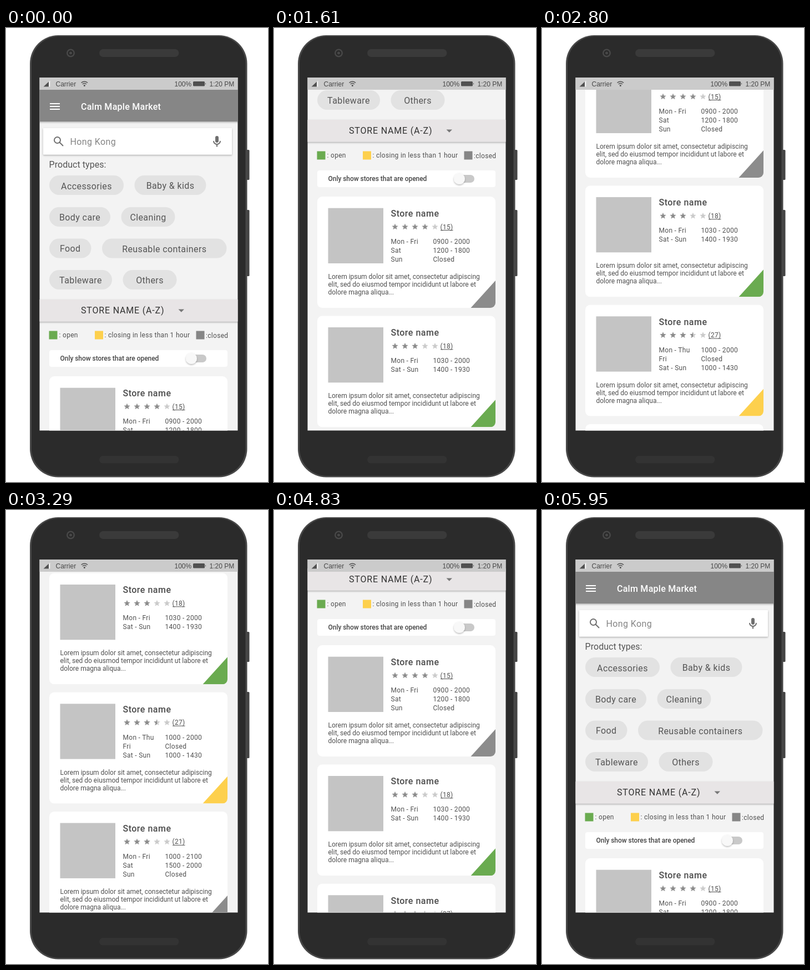
An HTML page that plays this animation: 472 px wide and 816 px high, repeating every 6.16 s.

```html
<!DOCTYPE html>
<html lang="en">
<head>
<meta charset="utf-8">
<title>Store list</title>
<style>
  html, body { margin: 0; width: 100%; height: 100%; overflow: hidden; background: #fff; }
  svg { display: block; font-family: Roboto, sans-serif; }
  .status { font: 12px "Liberation Sans", Arial, sans-serif; fill: #484848; }
  .label { font-size: 16px; letter-spacing: .4px; fill: #555; }
  .hint { fill: #858585; }
  .heading { letter-spacing: .05px; }
  .pill { text-anchor: middle; }
  .sort { font-size: 16px; letter-spacing: .82px; fill: #333; }
  .title { font-size: 16px; font-weight: 500; letter-spacing: .25px; fill: #fff; }
  .name { font-size: 16px; font-weight: 500; letter-spacing: .5px; fill: #4c4c4c; }
  .small { font-size: 12px; letter-spacing: .3px; fill: #505050; }
  .body { font-size: 12px; fill: #505050; }
  .option { font-size: 12px; font-weight: 500; letter-spacing: -.04px; fill: #444; }
</style>
</head>
<body>
<svg width="472" height="816" viewBox="0 0 472 816">
  <defs>
    <clipPath id="screen"><rect x="60.500" y="89" width="357" height="634.500"/></clipPath>
    <clipPath id="card"><rect x="78" width="321" height="200" rx="9"/></clipPath>
    <clipPath id="leftHalf"><rect x="-7" y="-7" width="7" height="14"/></clipPath>
    <filter id="shadow" x="-20%" y="-20%" width="140%" height="150%">
      <feDropShadow dx="0" dy="1.5" stdDeviation="1.5" flood-opacity=".3"/>
    </filter>
  </defs>

  <g id="phone">
    <rect x="430" y="219" width="8.5" height="54" rx="1.5" fill="#444"/>
    <rect x="430" y="327" width="8.5" height="119" rx="1.5" fill="#444"/>
    <rect x="43" y="13" width="391.500" height="794.500" rx="51" fill="#484848"/>
    <rect x="46" y="15" width="385.500" height="790" rx="49" fill="#2b2b2b"/>
    <circle cx="116.500" cy="45" r="7.500" fill="#484848"/>
    <circle cx="116.500" cy="45" r="5" fill="#292929"/>
    <circle cx="116.500" cy="45" r="2.500" fill="#484848"/>
    <rect x="168" y="38" width="143.500" height="14" rx="7" fill="#3a3a3a"/>
    <rect x="168" y="769" width="143.500" height="13.500" rx="6.700" fill="#333"/>
  </g>

  <g clip-path="url(#screen)">
    <rect x="60" y="89" width="358" height="635" fill="#f3f3f3"/>
    <g id="page">
      <rect x="56" y="100" width="366" height="68" fill="#868686" filter="url(#shadow)"/>
      <path d="M79 136h18M79 141h18M79 146h18" stroke="#fff" stroke-width="2"/>
      <text class="title" x="135" y="147">Calm Maple Market</text>

      <rect x="67" y="180" width="340" height="47.500" rx="1" fill="#fff" filter="url(#shadow)"/>
      <g fill="none" stroke="#6f6f6f" stroke-width="2">
        <circle cx="92.500" cy="201.500" r="5.500"/>
        <path d="M96.500 205.500l6.500 6.500"/>
        <path d="M374 203a6 6 0 0 0 12 0M380 209v4.500"/>
      </g>
      <rect x="377" y="194" width="6" height="12" rx="3" fill="#6f6f6f"/>
      <text class="label hint" x="115.500" y="210">Hong Kong</text>
      <text class="label heading" x="77.500" y="251">Product types:</text>
      <g id="pills"></g>

      <rect x="56" y="488" width="366" height="39.500" fill="#e8e5e6" filter="url(#shadow)"/>
      <text class="sort" x="135" y="513">STORE NAME (A-Z)</text>
      <path d="M310.500 505.500h10.500l-5.200 5.200z" fill="#777"/>

      <rect x="77.500" y="544.500" width="15" height="15" fill="#6aab50"/>
      <rect x="160" y="544.500" width="15" height="15" fill="#fdd04d"/>
      <rect x="342.500" y="544.500" width="15" height="15" fill="#868686"/>
      <text class="small" x="95.500" y="556">: open</text>
      <text class="small" x="177.500" y="556">: closing in less than 1 hour</text>
      <text class="small" x="360" y="557">:closed</text>

      <rect x="78" y="579" width="321" height="30" rx="4" fill="#fff"/>
      <text class="option" x="97.500" y="598">Only show stores that are opened</text>
      <rect x="326" y="587" width="35" height="14" rx="7" fill="#c9c9c9"/>
      <circle cx="334" cy="594" r="10" fill="#f8f8f8" filter="url(#shadow)"/>
      <g id="cards"></g>
    </g>

    <rect x="60" y="89" width="358" height="22" fill="#cbcbcb"/>
    <path d="M67.500 105.500h12v-11z" fill="#eee"/>
    <path d="M67.500 105.500h9.500v-9z" fill="#505050"/>
    <text class="status" x="89.500" y="104.500">Carrier</text>
    <g fill="none" stroke="#505050" stroke-width="1.500">
      <path d="M135.500 98.500q5.800-4.600 11.600 0M137.700 101q3.600-2.800 7.200 0"/>
    </g>
    <circle cx="141.300" cy="103.500" r="1.500" fill="#505050"/>
    <text class="status" x="303.500" y="104.500">100%</text>
    <rect x="337" y="96" width="21" height="8.500" rx="1.500" fill="#505050"/>
    <path d="M359 98.500q2 1.700 0 3.500z" fill="#505050"/>
    <text class="status" x="366.500" y="104.500">1:20 PM</text>
  </g>
</svg>

<script>
const GREY = '#8c8c8c', GREEN = '#6aab50', YELLOW = '#fdd04d';
const byId = id => document.getElementById(id);

// left, top, width, baseline, caption
const pills = [
  [78, 265, 134, 290, 'Accessories'], [231.5, 265, 129, 289, 'Baby &amp; kids'],
  [78, 322, 110, 346, 'Body care'], [207.5, 322, 97, 346, 'Cleaning'],
  [78, 378.5, 75.5, 402, 'Food'], [173, 378.5, 224.5, 403, 'Reusable containers'],
  [78, 435, 113, 459, 'Tableware'], [210.5, 435, 97, 459, 'Others']
];

const stores = [
  { rating: 4, reviews: 15, color: GREY,
    hours: [['Mon - Fri', '0900 - 2000'], ['Sat', '1200 - 1800'], ['Sun', 'Closed']] },
  { rating: 3, reviews: 18, color: GREEN,
    hours: [['Mon - Fri', '1030 - 2000'], ['Sat - Sun', '1400 - 1930']] },
  { rating: 3.5, reviews: 27, color: YELLOW,
    hours: [['Mon - Thu', '1000 - 2000'], ['Fri', 'Closed'], ['Sat - Sun', '1000 - 1430']] },
  { rating: 3, reviews: 21, color: GREY,
    hours: [['Mon - Fri', '1000 - 2100'], ['Sat', '1500 - 2000'], ['Sun', 'Closed']] }
];

const blurb = [
  'Lorem ipsum dolor sit amet, consectetur adipiscing',
  'elit, sed do eiusmod tempor incididunt ut labore et',
  'dolore magna aliqua...'
];

const text = (style, x, y, content) => `<text class="${style}" x="${x}" y="${y}">${content}</text>`;

const starPoints = Array.from({ length: 10 }, (_, i) => {
  const radius = i % 2 ? 2.6 : 6, angle = i * Math.PI / 5;
  return [radius * Math.sin(angle), -radius * Math.cos(angle)].map(v => v.toFixed(2));
}).join(' ');

function star(index, rating) {
  const shape = (color, clip = '') => `<polygon points="${starPoints}" fill="${color}" ${clip}/>`;
  const fill = rating - index;
  const half = fill > 0 && fill < 1 ? shape(GREY, 'clip-path="url(#leftHalf)"') : '';
  return `<g transform="translate(${218 + 18 * index} 54.5)">${shape(fill >= 1 ? GREY : '#cbcbcb')}${half}</g>`;
}

function card({ rating, reviews, color, hours }, index) {
  return `<g transform="translate(0 ${626 + 214.3 * index})">
    <g clip-path="url(#card)">
      <rect x="78" width="321" height="200" fill="#fff"/>
      <path d="M354.5 200h45v-49.500z" fill="${color}"/>
    </g>
    <rect x="97.5" y="20.7" width="99.500" height="99.300" fill="#c4c4c4"/>
    ${text('name', 210.5, 36, 'Store name')}
    ${[0, 1, 2, 3, 4].map(i => star(i, rating)).join('')}
    ${text('small', 299.5, 58.5, `(${reviews})`)}
    <path d="M300 60.500h22.500" stroke="#505050"/>
    ${hours.map(([days, time], i) =>
      text('small', 210.5, 85 + 16 * i, days) + text('small', 286.5, 85 + 16 * i, time)).join('')}
    ${blurb.map((line, i) => text('body', 97.5, 148 + 14 * i, line)).join('')}
  </g>`;
}

byId('pills').innerHTML = pills.map(([x, y, width, baseline, caption]) =>
  `<rect x="${x}" y="${y}" width="${width}" height="35" rx="17.500" fill="#e2e2e2"/>` +
  text('label pill', x + width / 2, baseline, caption)).join('');
byId('cards').innerHTML = stores.map(card).join('');

// Eases with a cubic Bézier whose handles are flat: (a, 0) and (b, 1).
function ease(x, a, b) {
  let low = 0, high = 1;
  for (let i = 0; i < 24; i++) {
    const t = (low + high) / 2, u = 1 - t;
    if (3 * u * u * t * a + 3 * u * t * t * b + t * t * t < x) low = t; else high = t;
  }
  return low * low * (3 - 2 * low);
}

const LOOP = 6160, STEP = 70;
const scrolls = [
  { start: 721, end: 1750, from: 0, to: 327, a: .4, b: .2 },
  { start: 2040, end: 3510, from: 327, to: 743, a: .42, b: .545 },
  { start: 4150, end: 5390, from: 743, to: 0, a: .42, b: .737 }
];

function scrollAt(time) {
  let offset = 0;
  for (const { start, end, from, to, a, b } of scrolls) {
    if (time >= end) offset = to;
    else if (time > start) offset = from + (to - from) * ease((time - start) / (end - start), a, b);
  }
  return Math.round(offset);
}

const page = byId('page');
function render() {
  const time = Math.floor(performance.now() % LOOP / STEP) * STEP;
  page.setAttribute('transform', `translate(0 ${-scrollAt(time)})`);
  requestAnimationFrame(render);
}
render();
</script>
</body>
</html>
```
